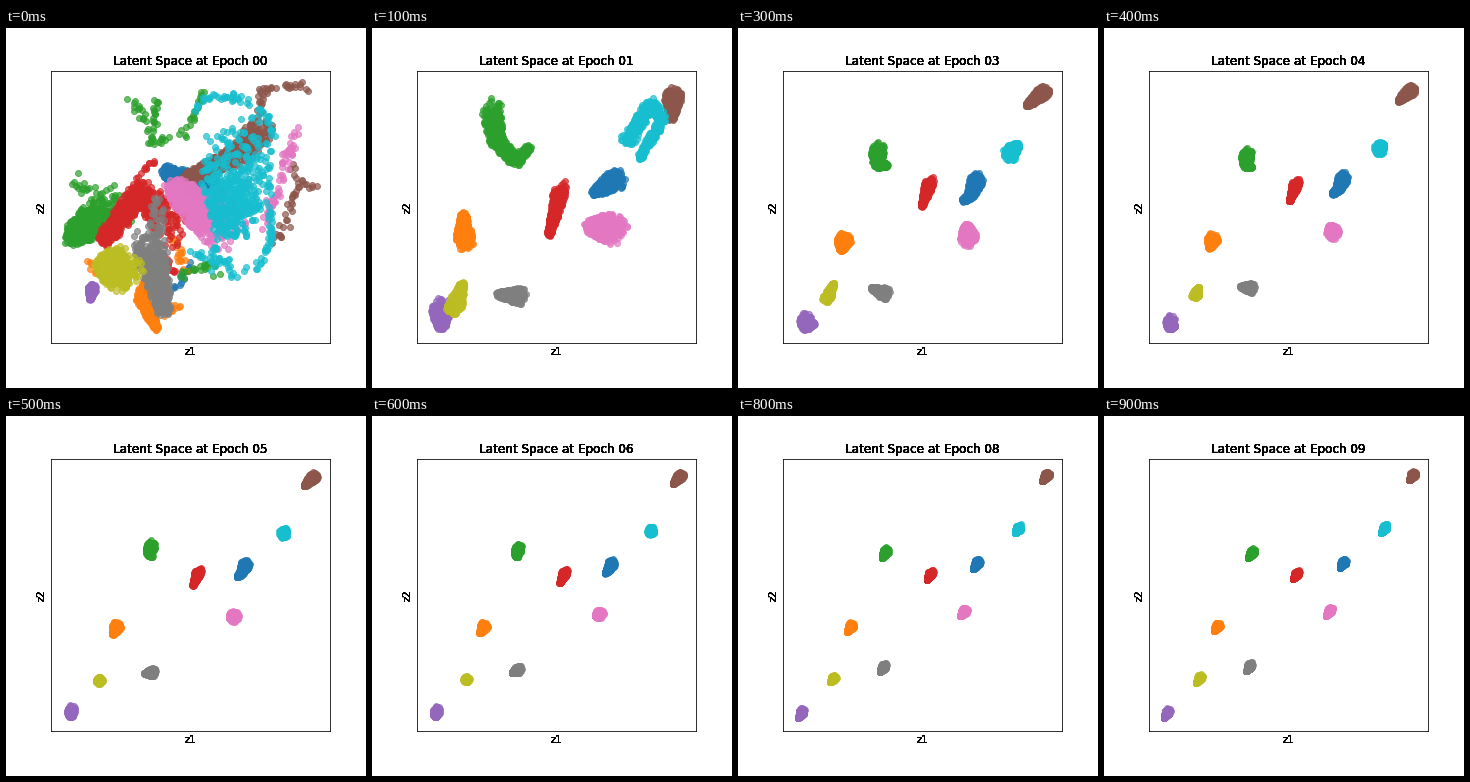
A matplotlib script for the animation above (1000 ms loop, 360 by 360 pixels).

```python
import numpy as np
import matplotlib.pyplot as plt
from matplotlib.animation import FuncAnimation

EPOCHS = 10
POINTS = 450        # samples per class
INSET = 3.3         # keeps dot rims inside a blob's outline
TAPER = 0.5         # how much a blob thins towards the end of its spine
DECAY = 0.7         # share of the remaining way left after each epoch


def digit(home, start, first, second, trails=()):
    """A class: (radius, *spine) blobs for epochs 0 to 2, then a final home."""
    x, y = home
    rest = (6.5, (x + 1.5, y - 2.5), (x - 3, y + 4))
    return dict(blobs=(start, first, second), rest=rest, trails=trails)


# Stage pixels, y pointing down; spines run from the fat end to the thin end.
DIGITS = [
    digit((238.5, 148), (20, (205, 165), (160, 143)),
          (14, (244, 151), (222, 164)),
          (13, (238, 154), (230, 176), (220, 182)),
          [[(168, 262), (185, 232)]]),
    digit((112.5, 211.5), (12, (150, 245), (135, 270), (150, 300)),
          (13, (92, 213), (91, 187)),
          (13, (102, 212), (100, 224)),
          [[(82, 233), (92, 246)], [(150, 284), (179, 279)],
           [(165, 205), (182, 245)]]),
    digit((147, 138), (27, (107, 180), (65, 208)),
          (14, (119, 80), (124, 112), (143, 133), (156, 119)),
          (13, (135, 114), (136, 134), (150, 135)),
          [[(124, 69), (138, 86), (145, 116), (182, 104), (196, 66)],
           [(150, 70), (145, 112)], [(70, 147), (70, 162), (85, 158)],
           [(172, 247), (205, 236), (214, 251)]]),
    digit((192, 159), (22, (168, 203), (135, 163), (98, 212)),
          (11, (189, 159), (177, 206)),
          (10, (191, 151), (181, 185)),
          [[(130, 150), (148, 132)], [(155, 225), (168, 245)]]),
    digit((62.5, 298), (8, (86, 260), (84, 271)),
          (15, (69, 281), (69, 298)),
          (12, (68, 289), (70, 298), (83, 292))),
    digit((308, 60.5), (18, (255, 100), (235, 125), (180, 150)),
          (13, (301, 67), (299, 90)),
          (12, (304, 66), (281, 83)),
          [[(303, 61), (298, 57), (257, 61), (248, 108)],
           [(287, 138), (293, 156), (310, 160)],
           [(290, 160), (281, 192), (270, 213)]]),
    digit((225, 196), (30, (215, 198), (168, 160)),
          (20, (240, 200), (218, 198)),
          (16, (231, 218), (232, 198)),
          [[(255, 200), (275, 150), (289, 103)], [(276, 128), (291, 113)],
           [(262, 190), (272, 160)]]),
    digit((145, 251.5), (22, (142, 214), (150, 245), (157, 283)),
          (12, (148, 268), (126, 266)),
          (11, (148, 274), (130, 262)),
          [[(149, 170), (146, 200)], [(152, 178), (153, 205)]]),
    digit((95, 263), (28, (116, 241), (99, 236)),
          (12, (82, 280), (90, 256)),
          (9, (85, 275), (97, 250))),
    digit((280, 113), (48, (232, 125), (225, 195)),
          (12, (254, 113), (279, 76), (290, 91), (267, 130)),
          (14, (266, 133), (280, 117)),
          [[(190, 85), (196, 68), (230, 70), (259, 86), (268, 114)],
           [(262, 150), (265, 212), (255, 235), (225, 248)],
           [(185, 225), (222, 234), (226, 248)], [(212, 200), (205, 240)]]),
]


def along(spine, t):
    """Points at the length fractions t of a polyline."""
    nodes = np.array(spine, float)
    length = np.cumsum(np.r_[0, np.hypot(*np.diff(nodes, axis=0).T)])
    return np.column_stack([np.interp(t * length[-1], length, v) for v in nodes.T])


def fill(blob, samples):
    """Spread samples over a tapered blob."""
    radius, *spine = blob
    t, turn, reach = samples.T
    spread = np.maximum(radius * (1 - TAPER * t) - INSET, 0) * np.sqrt(reach)
    angle = 2 * np.pi * turn
    offset = np.column_stack([np.cos(angle), np.sin(angle)]) * spread[:, None]
    return along(spine, t) + offset


def strew(trail, rng):
    """Loose dots following a polyline."""
    length = np.hypot(*np.diff(np.array(trail), axis=0).T).sum()
    t = rng.random(int(length / 2.5) + 2)
    return along(trail, t) + rng.normal(0, 2, (len(t), 2))


def points_at(epoch, label):
    data = DIGITS[label]
    rng = np.random.default_rng(label)
    samples = rng.random((POINTS, 3))
    points = fill(data["blobs"][min(epoch, 2)], samples)
    if epoch == 0:
        return np.vstack([points] + [strew(t, rng) for t in data["trails"]])
    if epoch > 2:
        last = EPOCHS - 3
        done = (1 - DECAY ** (epoch - 2)) / (1 - DECAY ** last)
        points += done * (fill(data["rest"], samples) - points)
    return points


plt.rcParams["font.family"] = "DejaVu Sans"
fig, ax = plt.subplots(figsize=(5, 5), dpi=72, facecolor="white")
fig.subplots_adjust(left=0.125, right=0.9, bottom=0.125, top=0.88)
ax.set(xlim=(45, 324), ylim=(315, 43.2), xticks=[], yticks=[])

clouds = [ax.scatter([], [], s=36, color=f"C{k}", alpha=0.7, zorder=2 + k / 100)
          for k in range(len(DIGITS))]


def heavy_text(x, y, text, size, **style):
    """Stack copies so the antialiased edges darken."""
    return [ax.text(x, y, text, fontsize=size, ha="center", **style)
            for _ in range(10)]


titles = heavy_text(184.5, 37.2, "", 12, va="baseline")
heavy_text(184.5, 319, "z1", 10, va="top")
heavy_text(41, 179.1, "z2", 10, va="bottom", rotation=90, rotation_mode="anchor")


def update(epoch):
    for label, cloud in enumerate(clouds):
        cloud.set_offsets(points_at(epoch, label))
    for title in titles:
        title.set_text(f"Latent Space at Epoch {epoch:02d}")
    return clouds + titles


anim = FuncAnimation(fig, update, frames=EPOCHS, interval=100, repeat=True)
plt.show()
```
